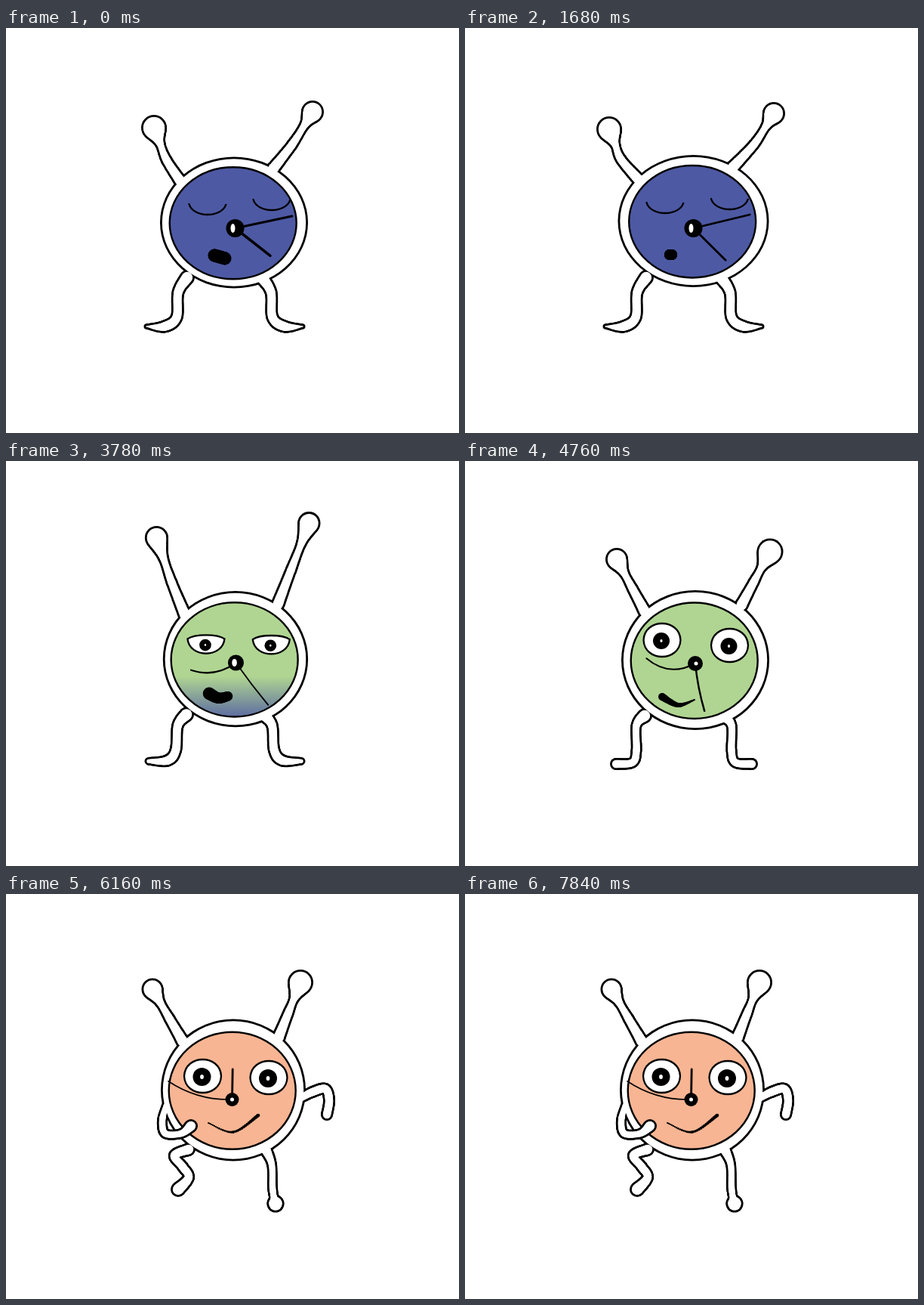
An HTML page with a canvas for the animation above (8 s loop, 600x536 px).

```html
<!DOCTYPE html>
<html lang="en">
<head>
<meta charset="utf-8">
<title>Alarm clock waking up</title>
<style>
html, body { margin: 0; width: 100%; height: 100%; overflow: hidden; background: #fff; }
canvas { display: block; width: 100%; height: 100%; }
</style>
</head>
<body>
<canvas id="stage" width="600" height="536"></canvas>
<script>
const ctx = document.getElementById('stage').getContext('2d');
const LOOP = 8000, STEP = 140, INK = '#000', PAPER = '#fff';
const BLUE = [77, 89, 163], GREEN = [176, 213, 146], ORANGE = [248, 181, 147];

// Every limb is a spine of [x, y, radius] points.
const limb = (points, root, middle, tip) => points.map(([x, y], i) =>
  [x, y, i === 0 ? root : i === points.length - 1 ? tip : middle]);
const flip = (spine, sum) => spine.map(([x, y, r]) => [sum - x, y, r]);
const pair = (spine, sum) => [spine, flip(spine, sum)];

// Antenna from root to knob, sagging outwards.
function horn(x0, y0, x1, y1, r, sag = 0) {
  const out = Math.sign(x1 - x0) * sag;
  const neck = 1 - (r + 7) / Math.hypot(x1 - x0, y1 - y0);
  const at = (k, bend, radius) => [x0 + (x1 - x0) * k + bend, y0 + (y1 - y0) * k, radius];
  return [at(0, 0, 8.5), at(0.42, out, 7), at(neck, out / 2, 6.5), at(1, 0, r)];
}

// lids: upper and lower bulge; pupil: radius, highlight; shine: offset and radii;
// hands: angle, length, bend, width; mouth: ends, sag, end radii.
const hiddenArm = limb(Array(5).fill([212, 262]), 2, 2, 2);
const rest = {
  body: [302, 257.5, 97, 86],
  horns: [horn(234, 207, 196, 132, 16, 5), horn(354, 186, 406, 111, 14, 3)],
  legs: pair(limb([[240, 330], [228, 350], [226, 383], [210, 395], [186, 395]], 9, 7.5, 2.5), 579),
  arms: pair(hiddenArm, 604),
  eyes: [[267, 233], [352, 227]], eyeWidth: 24.5, lids: [14, 14], pupil: [4, 0],
  nose: [303.5, 265, 12], shine: [-3, 3, 6],
  short: [38, 59, 0, 3.5], long: [-12, 77, 0, 3],
  mouth: [276, 301, 290, 305, 0, 8.5, 8.5],
  front: [0, 0], sweep: 135, tint: GREEN
};

const inhale = { ...rest,
  body: [302.5, 255.5, 99, 86.5],
  horns: [horn(232, 203, 191, 134, 16, 8), horn(355, 184, 409, 113, 14, 5)],
  eyes: [[265, 231], [350.5, 226]],
  nose: [302.5, 265, 12],
  short: [44.7, 60, 0, 2.8], long: [-13.6, 77, 0, 2.6],
  mouth: [271, 300, 274, 300, 0, 7, 7]
};

const drowsy = { ...rest,
  body: [303, 261, 93.5, 87],
  horns: [horn(236, 208, 198, 134, 15, 3), horn(355, 188, 399, 109, 12)],
  legs: pair(limb([[240, 334], [228, 350], [223, 382], [207, 394], [179, 394]], 9, 8, 2), 580),
  eyes: [[268.5, 234], [352, 229]], lids: [10, 17], pupil: [5, 1],
  nose: [304, 266, 11], shine: [-4.5, 4, 7.5],
  short: [157, 56, -10, 2.3], long: [29, 76, 0, 1.3],
  mouth: [276, 304, 285, 307, 0, 11, 11],
  sweep: 243
};

const awake = { ...drowsy,
  body: [305, 263.5, 97, 91.5],
  horns: [horn(238, 199, 201, 130, 14), horn(366, 191, 404, 120, 16.5)],
  legs: pair(limb([[238, 337], [227, 350], [227, 383], [222, 399], [200, 401]], 9, 6.5, 7), 580),
  eyes: [[261, 237], [350.5, 244]], lids: [-22, 22], pupil: [11, 2],
  nose: [305, 268, 10], shine: [1, 2.5, 2.5],
  short: [186, 65, -22, 2], long: [79, 64, 3, 2.5],
  mouth: [261, 312, 304, 316, 9, 5, 1],
  sweep: 400
};

const jump = { ...awake,
  body: [303.5, 224, 94.5, 90.5],
  horns: [horn(236, 165, 215, 83, 16), horn(368, 163, 378.5, 67, 12.5)],
  legs: pair(limb([[236, 296], [230, 325], [230, 350], [231, 366], [217, 378]], 8, 6, 7), 581),
  arms: pair(limb([[212, 224], [203, 208], [185, 180], [178, 174], [171, 176]], 5, 5, 8), 603),
  eyes: [[261, 203], [349.5, 202]], eyeWidth: 26, pupil: [13, 4.5],
  nose: [299, 235, 10],
  short: [272, 48, 0, 3], long: [182, 85, 0, 1.5],
  mouth: [260, 260, 350, 254, 20, 4, 1.2],
  tint: ORANGE
};

const swing = { ...jump,
  body: [301, 259.5, 95, 93],
  horns: [horn(235, 195, 200, 130, 13), horn(362, 190, 402, 118, 15)],
  legs: [limb([[242, 337], [226, 349], [230, 363], [236, 376], [231, 390]], 8, 7, 10),
         limb([[344, 338], [352, 358], [353, 388], [355, 402], [357, 410]], 8, 6, 10.5)],
  arms: [limb([[215, 282], [204, 298], [194, 317], [193, 326], [203, 327]], 7, 6.5, 5),
         limb([[388, 270], [407, 269], [425, 270], [428, 285], [421, 297]], 5, 6, 6.5)],
  eyes: [[261, 239], [349.5, 241]], eyeWidth: 24.5, pupil: [12, 2.5],
  nose: [298.5, 272, 9.5], shine: [0, 0, 0],
  short: [274, 42, 0, 3], long: [185.5, 84, -10, 1.6],
  mouth: [265, 300, 334, 294, 19, 2, 1.8]
};

const dance = { ...swing,
  horns: [horn(234, 195, 194, 126, 13.5), horn(361, 190, 390, 117, 16)],
  legs: [limb([[242, 338], [223, 346], [234, 361], [242, 375], [228, 391]], 8, 7, 9), swing.legs[1]],
  arms: [limb([[212, 280], [207, 300], [211, 317], [232, 317], [245, 307]], 5, 6, 8),
         limb([[389, 271], [406, 262], [423, 258], [428, 273], [425, 292]], 6, 7, 7)],
  eyes: [[260.5, 241], [348, 243]], pupil: [12, 3],
  nose: [299.5, 272, 9], shine: [0, 2.5, 2.5],
  short: [271, 40, 0, 2.8], long: [196, 88, -14, 1.6],
  mouth: [268, 303, 334, 293, 17, 1, 2.3],
  front: [1, 0]
};

function mix(a, b, k) {
  if (typeof a === 'number') return a + (b - a) * k;
  if (Array.isArray(a)) return a.map((v, i) => mix(v, b[i], k));
  return Object.fromEntries(Object.keys(a).map(name => [name, mix(a[name], b[name], k)]));
}

function mirror(pose) {
  const swap = ([left, right]) => [flip(right, 604), flip(left, 604)];
  return { ...pose, horns: swap(pose.horns), legs: swap(pose.legs), arms: swap(pose.arms),
    front: [pose.front[1], pose.front[0]] };
}

// Scale the antennae away from their roots.
const reach = (pose, kx, ky) => ({ ...pose, horns: pose.horns.map(spine => {
  const [x0, y0] = spine[0];
  return spine.map(([x, y, r]) => [x0 + (x - x0) * kx, y0 + (y - y0) * ky, r]);
}) });

const full = { ...mix(rest, inhale, 3.5), mouth: [267, 300, 270, 300, 0, 4, 4] };
const stretch = reach(mix(drowsy, awake, 0.55), 1, 1.5);
const spread = reach(mix(drowsy, awake, 0.75), 1.25, 0.95);
const crouch = { ...mix(awake, jump, -0.1), short: jump.short, long: jump.long, tint: ORANGE };

const breath = t => [[t, rest], [t + 140, rest], [t + 280, inhale], [t + 700, full], [t + 980, full]];
const dancing = Array.from({ length: 5 }, (_, i) => {
  const t = 6020 + i * 420, side = i % 2 ? mirror : pose => pose;
  return [[t, side(swing)], [t + 140, side(dance)], [t + 280, side(dance)]];
}).flat();
const keys = [
  ...breath(0), ...breath(1400),
  [2940, drowsy], [3920, stretch], [4200, spread], [4760, awake], [4900, awake],
  [5180, crouch], [5320, crouch], [5600, jump], [5740, jump],
  ...dancing, [LOOP, dance]
];

function poseAt(time) {
  const t = Math.floor(time / STEP) * STEP;
  const next = keys.findIndex(([end]) => end > t);
  const [t0, a] = keys[next - 1], [t1, b] = keys[next];
  return mix(a, b, (t - t0) / (t1 - t0));
}

// Catmull-Rom curve through a spine.
function samples(points) {
  const out = [], n = 16, last = points.length - 1;
  for (let i = 0; i < last; i++) {
    const a = points[Math.max(0, i - 1)], b = points[i];
    const c = points[i + 1], d = points[Math.min(last, i + 2)];
    for (let j = 0; j <= n; j++) {
      const u = j / n;
      out.push(b.map((p, m) => {
        const linear = c[m] - a[m];
        const square = 2 * a[m] - 5 * p + 4 * c[m] - d[m];
        const cube = 3 * (p - c[m]) + d[m] - a[m];
        return p + u / 2 * (linear + u * (square + u * cube));
      }));
    }
  }
  return out;
}

function oval(x, y, rx, ry, color) {
  ctx.beginPath();
  ctx.ellipse(x, y, Math.max(0, rx), Math.max(0, ry), 0, 0, 2 * Math.PI);
  ctx.fillStyle = color;
  ctx.fill();
}

function blob(spine, color, grow = 0, from = 0) {
  const all = samples(spine);
  all.slice(Math.floor(all.length * from)).forEach(([x, y, r]) => oval(x, y, r + grow, r + grow, color));
}

function drawDial([x, y, rx, ry], sweep, tint) {
  const fill = ctx.createLinearGradient(0, sweep - 32, 0, sweep + 32);
  fill.addColorStop(0, `rgb(${tint.map(Math.round)})`);
  fill.addColorStop(1, `rgb(${BLUE})`);
  oval(x - 1.3, y + 0.7, 84, ry / 2 + 31, fill);
  ctx.lineWidth = 2.4;
  ctx.stroke();
}

function drawEye([x, y], width, [up, low], [radius, shine]) {
  const lid = (from, to, bulge) => {
    const inset = Math.max(0, 1 - Math.abs(bulge) / width) * (to - from) / 4, h = y + bulge * 4 / 3;
    ctx.bezierCurveTo(from + inset, h, to - inset, h, to, y);
  };
  ctx.beginPath();
  ctx.moveTo(x - width, y);
  lid(x - width, x + width, low);
  lid(x + width, x - width, up);
  ctx.fillStyle = PAPER;
  ctx.fill();
  ctx.lineWidth = 2.3;
  ctx.stroke();
  ctx.save();
  ctx.clip();
  const py = y + 1 + (up + low) / 2;
  oval(x - 1, py, radius, radius, INK);
  oval(x - 1, py, shine * 0.8, shine, PAPER);
  ctx.restore();
}

function drawHand([degrees, length, bend, width], [x, y]) {
  const a = degrees * Math.PI / 180, dx = Math.cos(a), dy = Math.sin(a), half = length / 2;
  ctx.beginPath();
  ctx.moveTo(x, y);
  ctx.quadraticCurveTo(x + dx * half - dy * bend, y + dy * half + dx * bend, x + dx * length, y + dy * length);
  ctx.lineWidth = width;
  ctx.stroke();
}

function drawMouth([x0, y0, x1, y1, sag, r0, r1]) {
  blob([[x0, y0, r0], [(x0 + x1) / 2, (y0 + y1) / 2 + sag, (r0 + r1) / 2], [x1, y1, r1]], INK);
}

function draw(pose) {
  ctx.fillStyle = PAPER;
  ctx.fillRect(0, 0, 600, 536);
  ctx.strokeStyle = INK;
  ctx.lineCap = 'round';

  const outline = [[INK, 1], [PAPER, -1.8]];
  const [bx, by, rx, ry] = pose.body;
  for (const [color, grow] of outline) {
    oval(bx, by, rx + grow, ry + grow, color);
    [...pose.horns, ...pose.legs, ...pose.arms].forEach(spine => blob(spine, color, grow));
  }

  drawDial(pose.body, pose.sweep, pose.tint);
  pose.eyes.forEach(eye => drawEye(eye, pose.eyeWidth, pose.lids, pose.pupil));
  drawHand(pose.long, pose.nose);
  drawHand(pose.short, pose.nose);
  const [nx, ny, nr] = pose.nose, [shift, sx, sy] = pose.shine;
  oval(nx, ny, nr, nr, INK);
  oval(nx + shift, ny, sx, sy, PAPER);
  drawMouth(pose.mouth);

  // An arm held in front of the dial.
  pose.arms.forEach((arm, i) => {
    if (pose.front[i] < 0.6) return;
    blob(arm, INK, 1, 0.3);
    blob(arm, PAPER, -1.8, 0.2);
  });
}

const start = performance.now();
function tick() {
  draw(poseAt((performance.now() - start) % LOOP));
  requestAnimationFrame(tick);
}
tick();
</script>
</body>
</html>
```
